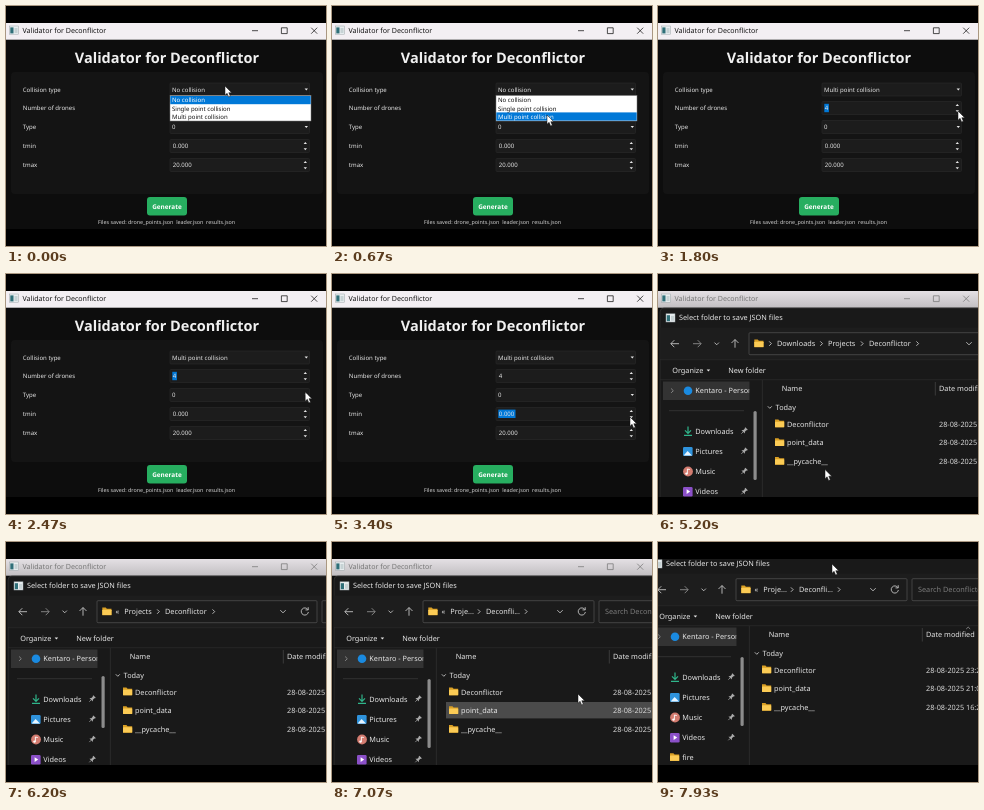
An HTML page that plays this animation: 320x240 px, repeating every 8 s.

```html
<!DOCTYPE html>
<html lang="en">
<head>
<meta charset="utf-8">
<title>Validator</title>
<style>
html, body { margin: 0; width: 100%; height: 100%; overflow: hidden; background: #000; }
svg { display: block; width: 100vw; height: 100vh; }
text { font-family: "Noto Sans", "Open Sans", sans-serif; text-rendering: geometricPrecision; white-space: pre; }
</style>
</head>
<body>
<svg id="stage" viewBox="0 0 320 240" xmlns="http://www.w3.org/2000/svg"></svg>
<script>
const LOOP = 8000;
const BLUE = '#0078d7';

const text = (x, y, str, size, fill = '#e6e6e6', extra = '') =>
  `<text x="${x}" y="${y}" font-size="${size}" fill="${fill}" ${extra}>${str}</text>`;
const rect = (x, y, w, h, fill, extra = '') =>
  `<rect x="${x}" y="${y}" width="${w}" height="${h}" fill="${fill}" ${extra}/>`;
const line = (d, color = '#d8d8d8', width = 0.8, extra = '') =>
  `<path d="${d}" fill="none" stroke="${color}" stroke-width="${width}" ${extra}/>`;
const solid = (d, fill = '#e6e6e6') => `<path d="${d}" fill="${fill}"/>`;
const group = (id, body, extra = '') => `<g id="${id}" ${extra}>${body}</g>`;

// Main window
const ui = (x, y, str, fill, extra) => text(x, y, str, 6.05, fill, extra);
const triangle = (x, y, dir) => solid(`M${x - 1.7} ${y - dir}h3.4l-1.7 ${dir * 2}z`);
const windowIcon = (x, y) =>
  rect(x, y, 9, 8.2, '#e9eef0', 'stroke="#99a3a6" stroke-width=".5"') +
  rect(x + 0.8, y + 1.4, 3.2, 6, '#2f6f78') + rect(x + 5, y + 2, 3, 5, '#c6d2d4');

function field(y, label, body, spin) {
  const arrows = spin
    ? triangle(299.3, y - 3, -1) + triangle(299.3, y + 3.2, 1)
    : triangle(300.3, y, 1);
  return ui(16.8, y + 2.2, label) +
    rect(164, y - 6.5, 139.5, 13, '#1c1c1c', 'rx="1" stroke="#2b2b2b" stroke-width=".6"') +
    body + arrows;
}

function titleBar() {
  return rect(0, 17, 320, 16.7, '#f3eff3', 'id="bar"') + windowIcon(3.5, 20) +
    group('barText',
      text(16.5, 27.3, 'Validator for Deconflictor', 7.1, 'currentColor') +
      line('M246 24.7h6M275.4 21.8h5.8v5.8h-5.8zM305.2 21.7l6 6M311.2 21.7l-6 6', 'currentColor', 0.75),
      'color="#151515"');
}

function mainWindow() {
  const options = ['No collision', 'Single point collision', 'Multi point collision'];
  const list = rect(164, 89.5, 141, 25.5, '#fff', 'stroke="#777" stroke-width=".5"') +
    rect(164.3, 90, 140.4, 8.2, BLUE, 'id="choice"') +
    options.map((o, i) => ui(166, 96.4 + i * 8.2, o, '#111', 'class="option"')).join('');
  return rect(0, 32, 320, 192, '#0d0d0d') + titleBar() +
    text(161, 57.2, 'Validator for Deconflictor', 14.5, '#f0f0f0', 'font-weight="700" text-anchor="middle"') +
    rect(5, 66, 312, 122, '#141414', 'rx="4"') +
    field(83.5, 'Collision type', ui(166, 85.7, '', undefined, 'id="kind"')) +
    field(102, 'Number of drones', rect(166.3, 97.8, 4.6, 8.4, BLUE, 'id="pickCount"') + ui(166.8, 104.2, '4'), true) +
    field(121, 'Type', ui(166, 123.2, '0')) +
    field(140, 'tmin', rect(166.3, 135.6, 17.2, 8.4, BLUE, 'id="pickMin"') + ui(166.8, 142.2, '0.000'), true) +
    field(159, 'tmax', ui(166.8, 161.2, '20.000'), true) +
    rect(141, 191, 40, 18.5, '#27ae60', 'rx="3"') +
    text(161, 202.9, 'Generate', 6.4, '#fff', 'font-weight="700" text-anchor="middle"') +
    text(160.5, 218.2, 'Files saved: drone_points.json  leader.json  results.json', 5.4, '#d0d0d0', 'text-anchor="middle"') +
    group('list', list);
}

// Folder dialog
const label = (x, y, str, fill, extra) => text(x, y + 2.6, str, 7.3, fill, extra);
const chevron = (x, y, color) => line(`M${x - 1.1} ${y - 2.2}l2.2 2.2l-2.2 2.2`, color);
const chevronDown = (x, y, size = 2.2) => line(`M${x - size} ${y - size / 2}l${size} ${size}l${size} ${-size}`);
const folder = (x, y) =>
  solid(`M${x} ${y - 4.4}h3.4l1.2 1.2h4.6v6.5h-9.2z`, '#d99f24') +
  rect(x, y - 2.2, 9.2, 5.4, '#fbcb55', 'rx=".6"');
const pin = y =>
  `<g transform="translate(86 ${y}) rotate(45)">` +
  solid('M-1.7 -3.6h3.4v.9l-.6.5v2l1.3 1.4h-4.8l1.3-1.4v-2l-.6-.5z', '#aaa') +
  line('M0 1v2.8', '#aaa', 0.7) + '</g>';

function sidebar() {
  const icons = [
    line('M30 152.5v6.5M27 156.3l3 3l3-3M26 161.3h8', '#2fb58a', 1.2),
    rect(25, 173, 9.6, 9, '#2f93dc', 'rx="1.2"') + solid('M25.6 181.4l4-4.5l4.4 4.5z', '#e8f5ff'),
    '<circle cx="30" cy="197.5" r="4.9" fill="#d37c70"/>' +
      line('M29.4 199.6v-4.6l2.4.6', '#fff', 0.9) + '<circle cx="28.5" cy="199.6" r="1.2" fill="#fff"/>',
    rect(25, 213, 9.6, 9.4, '#8b50c8', 'rx="1.2"') + solid('M28.6 215.3l3.6 2.3l-3.6 2.3z', '#fff')
  ];
  const rows = ['Downloads', 'Pictures', 'Music', 'Videos'].map((name, i) => {
    const y = 157 + i * 20.2;
    return icons[i] + label(37.3, y, name) + pin(y);
  }).join('');
  return rect(5, 107.5, 86.5, 18.5, '#333') + chevron(14.2, 116.7, '#999') +
    '<circle cx="30" cy="116.7" r="4.3" fill="#1a8ae0"/>' +
    label(37.3, 116.7, 'Kentaro - Personal', undefined, 'clip-path="url(#sideClip)"') +
    line('M11 136.7h75', '#3c3c3c', 0.7) + rows +
    folder(25, 237.6) + label(37.3, 237.6, 'fire') +
    rect(95.5, 137, 3.2, 69, '#8c8c8c', 'id="thumb" rx="1.6"');
}

function fileList() {
  const files = [['Deconflictor', '23:21'], ['point_data', '21:04'], ['__pycache__', '16:25']];
  return line('M104.3 106v160', '#303030', 0.8) +
    label(123.7, 114.6, 'Name') + label(281, 114.6, 'Date modified') +
    line('M277.3 108v13.5', '#484848', 0.7) + line('M321.2 109l2-1.9l2 1.9', '#aaa', 0.7) +
    chevronDown(111.8, 133.3, 2) + label(117.6, 133.2, 'Today') +
    rect(114, 160, 400, 16.4, '#4b4b4b', 'id="hover"') +
    files.map(([name, time], i) => {
      const y = 150 + i * 18.7;
      return folder(117, y) + label(129, y, name) + label(281, y, '28-08-2025 ' + time, '#d8d8d8');
    }).join('');
}

function crumbs(id, parts) {
  const body = parts.map(([x, str]) => str === '>' ? chevron(x, 69.6) : label(x, 69.5, str)).join('');
  return group(id, body);
}

function dialog() {
  const nav = line('M21 69.7h-8M16.3 66.2l-3.5 3.5l3.5 3.5') +
    line('M35 69.7h8M39.7 66.2l3.5 3.5l-3.5 3.5', '#999') +
    chevronDown(58.7, 69.7) + line('M77 73.7v-8M73.5 69l3.5-3.5l3.5 3.5');
  const barTools = chevronDown(-34, 69.5, 2.7) +
    line('M-9.1 67.6a3.6 3.6 0 1 0 .5 2.4M-8.8 65.2v2.7h-2.7') +
    rect(5, 58.7, 160, 22, '#1b1b1b', 'rx="1" stroke="#555" stroke-width=".7"') +
    label(11, 69.7, 'Search Deconflictor', '#7c7c7c');
  return rect(2, 34, 520, 260, '#191919', 'rx="4" stroke="#3a3a3a" stroke-width=".6"') +
    windowIcon(8, 39.8) + label(20.9, 43.8, 'Select folder to save JSON files') +
    rect(2.3, 53.5, 519, 32, '#1d1d1d') + nav +
    rect(91, 58.7, 200, 22, '#1b1b1b', 'id="address" rx="1" stroke="#555" stroke-width=".7"') +
    folder(96.3, 69.9) +
    crumbs('long', [[112.3, '>'], [119, 'Downloads'], [163.4, '>'], [170, 'Projects'], [204, '>'], [211, 'Deconflictor'], [259.5, '>']]) +
    crumbs('medium', [[109.5, '«'], [118.3, 'Projects'], [152.2, '>'], [159, 'Deconflictor'], [207.6, '>']]) +
    crumbs('short', [[109.5, '«'], [118.3, 'Proje...'], [147, '>'], [154, 'Deconfli...'], [194, '>']]) +
    group('barTools', barTools) +
    line('M2 85.7h520M2 105.7h520', '#2b2b2b', 0.7) +
    label(14.2, 96.2, 'Organize') + solid('M48.6 95.4h3.6l-1.8 2z') + label(70.2, 96.2, 'New folder') +
    sidebar() + fileList();
}

const stage = document.getElementById('stage');
stage.innerHTML = `<defs>
  <clipPath id="screen"><rect y="17" width="320" height="206"/></clipPath>
  <clipPath id="sideClip"><rect x="5" y="105" width="86.3" height="24"/></clipPath>
  <linearGradient id="dimBar" x2="0" y2="1"><stop stop-color="#e4e0e4"/><stop offset="1" stop-color="#c2bfc2"/></linearGradient>
</defs>` + rect(0, 0, 320, 240, '#000') +
  `<g clip-path="url(#screen)">${mainWindow()}${group('dialog', dialog())}` +
  group('cursor', '<path d="M0 0v9.2l2.1-1.9l1.5 3.6l1.7-.7l-1.5-3.5h2.9z" fill="#fff" stroke="#111" stroke-width=".5"/>') + '</g>';

const el = {};
stage.querySelectorAll('[id]').forEach(node => el[node.id] = node);
const options = [...stage.querySelectorAll('.option')];
const show = (node, on) => node.setAttribute('display', on ? 'inline' : 'none');
const move = (node, x, y) => node.setAttribute('transform', `translate(${x} ${y})`);

// Eased value of a track of [time, ...values] stops
function sample(track, t) {
  const i = track.findIndex(stop => stop[0] > t);
  if (i === 0) return track[0].slice(1);
  if (i < 0) return track[track.length - 1].slice(1);
  const a = track[i - 1], b = track[i];
  const k = (t - a[0]) / (b[0] - a[0]);
  const eased = k * k * (3 - 2 * k);
  return a.slice(1).map((v, n) => v + (b[n + 1] - v) * eased);
}

const pointer = [
  [0, 219, 80], [150, 219, 82], [650, 215, 109], [900, 215, 109],
  [1500, 299, 101], [1800, 300, 105], [2150, 300, 105], [2900, 298, 138],
  [3200, 298, 143], [3600, 298, 143], [4200, 163, 198], [4600, 163, 198],
  [5000, 167, 195.5], [5240, 167, 195.5], [5530, 326, 180], [6600, 326, 186],
  [6930, 250, 165], [7070, 246, 152], [7420, 187, 44], [7500, 187, 44], [7920, 174, 22]
];
const addressEnd = [[5530, 345], [5800, 311], [6220, 311], [6700, 262]];
const thumbSpan = [[5530, 137, 69], [5800, 134, 52], [6220, 134, 52], [6700, 137, 69]];
const dragOffset = [[7500, 0, 0], [7920, -13, -22]];

function render(t) {
  const [px, py] = sample(pointer, t);
  move(el.cursor, px, py);

  const listOpen = t < 870;
  const chosen = Math.max(0, Math.min(2, Math.floor((py - 90) / 8.2)));
  show(el.list, listOpen);
  el.choice.setAttribute('y', 90 + chosen * 8.2);
  options.forEach((o, i) => o.setAttribute('fill', i === chosen ? '#fff' : '#111'));
  el.kind.textContent = listOpen ? 'No collision' : 'Multi point collision';
  show(el.pickCount, t >= 1530 && t < 3000);
  show(el.pickMin, t >= 3000 && t < 4330);

  const open = t >= 4530;
  show(el.dialog, open);
  el.dialog.setAttribute('opacity', Math.min(1, Math.max(0, (t - 4500) / 150)));
  el.bar.setAttribute('fill', open ? 'url(#dimBar)' : '#f3eff3');
  el.barText.setAttribute('color', open ? '#777' : '#151515');

  const [end] = sample(addressEnd, t);
  el.address.setAttribute('width', end - 91);
  move(el.barTools, end, 0);
  show(el.long, end > 318);
  show(el.medium, end <= 318 && end > 270);
  show(el.short, end <= 270);
  const [thumbY, thumbHeight] = sample(thumbSpan, t);
  el.thumb.setAttribute('y', thumbY);
  el.thumb.setAttribute('height', thumbHeight);
  move(el.dialog, ...sample(dragOffset, t));

  show(el.hover, t >= 6830 && t < 7180);
  el.hover.setAttribute('y', t < 7090 ? 160 : 141.5);
}

function tick() {
  render(performance.now() % LOOP);
  requestAnimationFrame(tick);
}
tick();
</script>
</body>
</html>
```
